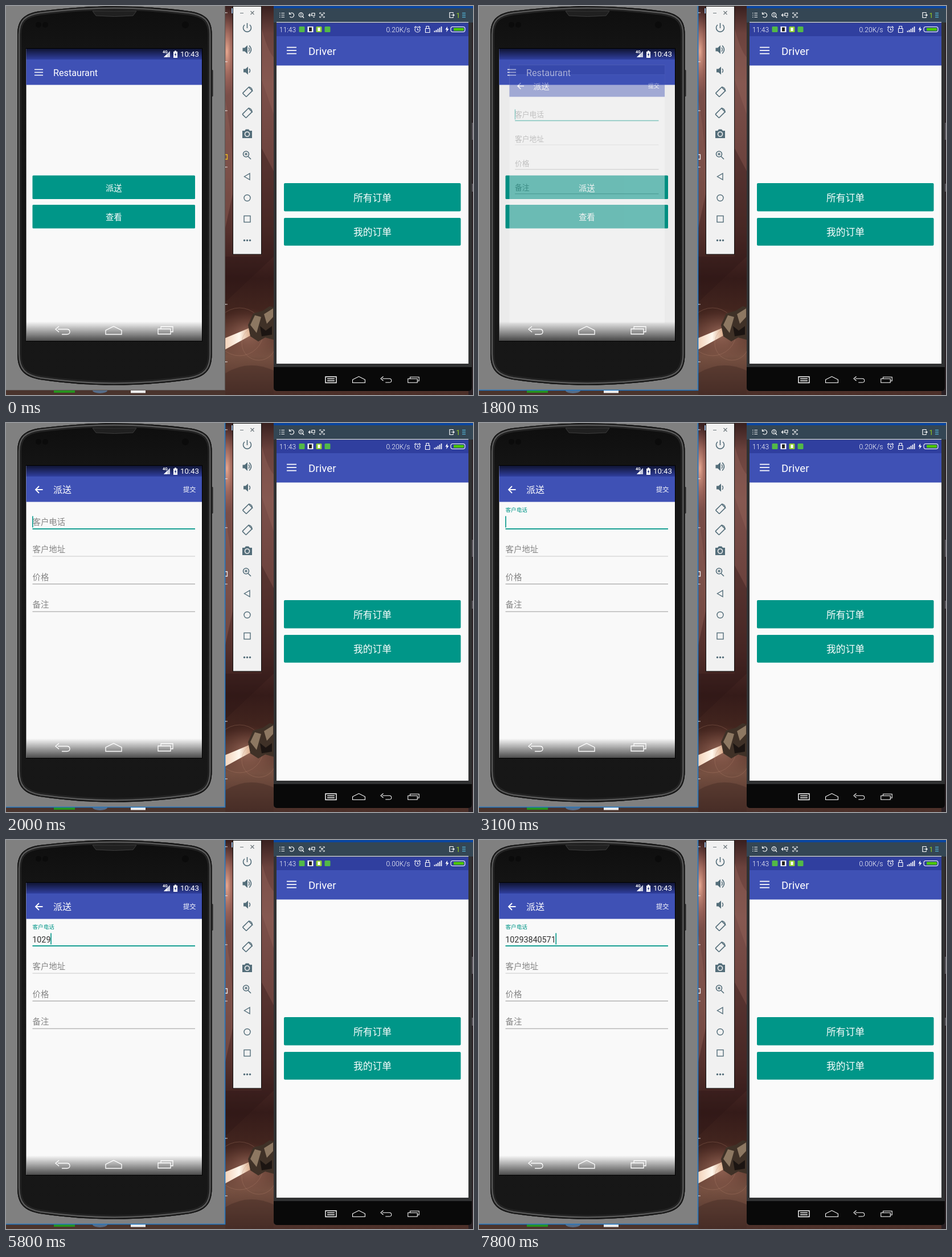
These frames come from a looping animation (820x683 px, 8 s). An HTML page:

```html
<!DOCTYPE html>
<html lang="zh">
<head>
<meta charset="utf-8">
<title>Delivery apps</title>
<style>
html, body { margin: 0; width: 100%; height: 100%; overflow: hidden; background: #3a221e; }
svg { display: block; width: 820px; height: 683px; }
text { font-family: Roboto, "Noto Sans CJK SC", "Noto Sans CJK", sans-serif; white-space: pre; }
.m { text-anchor: middle; }
.w { fill: #fff; }
.line { fill: none; stroke: #fff; }
.tool { fill: none; stroke: #546e7a; stroke-width: 1.6; }
.solid { fill: #546e7a; stroke: none; }
.hint { fill: #858585; font-size: 14.4px; }
</style>
</head>
<body>
<svg viewBox="0 0 820 683">
<defs>
  <linearGradient id="wall" x2="0" y2="1">
    <stop offset="0" stop-color="#38201f"/><stop offset=".07" stop-color="#6b423d"/>
    <stop offset=".2" stop-color="#7c504a"/><stop offset=".42" stop-color="#6b423d"/>
    <stop offset=".58" stop-color="#54302c"/><stop offset=".7" stop-color="#351b19"/>
    <stop offset=".79" stop-color="#44261f"/><stop offset=".9" stop-color="#765041"/>
    <stop offset="1" stop-color="#4a2e28"/>
  </linearGradient>
  <radialGradient id="glow"><stop offset="0" stop-color="#f5b49a" stop-opacity=".9"/><stop offset="1" stop-color="#b0655a" stop-opacity="0"/></radialGradient>
  <linearGradient id="beam" x2="1"><stop offset="0" stop-color="#f3d3bb"/><stop offset=".5" stop-color="#fff8ee"/><stop offset="1" stop-color="#f0b78c" stop-opacity=".7"/></linearGradient>
  <linearGradient id="glass" x2="0" y2="1"><stop offset="0" stop-color="#0e0e0e"/><stop offset=".15" stop-color="#161616"/><stop offset="1" stop-color="#171717"/></linearGradient>
  <linearGradient id="top" x2="0" y2="1"><stop offset="0" stop-opacity=".68"/><stop offset="1" stop-opacity="0"/></linearGradient>
  <linearGradient id="foot" x2="0" y2="1"><stop offset="0" stop-opacity="0"/><stop offset="1" stop-opacity=".7"/></linearGradient>
  <clipPath id="screen"><path d="M35.500 75H344V588H35.500Z"/></clipPath>
  <path id="body" d="M20 50C20 24 32 13 60 9C110 3 150 .5 190 .5S272 3 321 9C350 13 361.500 24 361.500 50V611C361.500 640 349 651 322 656C272 663 232 665.500 190 665.500S110 663 60 656C33 651 20 640 20 611Z"/>
  <clipPath id="shell"><use href="#body"/></clipPath>
  <g id="back"><path d="M-8 -3H8Q13 -3 13 1.500T8 6H-1M-6 -8L-12 -3L-6 2"/></g>
  <path id="home" d="M-14 7V0L0 -7L14 0V7Z"/>
  <g id="recent"><path d="M-13 -2H9V7H-13ZM-8 -2V-6H13V3H9"/></g>
  <path id="burger" d="M0 0H15M0 5H15M0 10H15"/>
  <g id="turn">
    <rect x="-7.500" y="-4.500" width="15" height="9" rx="1" transform="rotate(45)"/>
    <path d="M-9 -1Q-8.500 -8 -2 -9" stroke-width="1.300"/>
  </g>
</defs>

<!-- desktop -->
<rect width="820" height="683" fill="url(#wall)"/>
<ellipse cx="388" cy="80" rx="18" ry="78" fill="url(#glow)"/>
<path d="M385 165Q400 240 398 330L385 390ZM449 40Q460 80 470 90V190L449 130Z" fill="#93645a" opacity=".4"/>
<path d="M449 250L470 290V440L385 520V440H449Z" fill="#2c1616" opacity=".35"/>
<ellipse cx="425" cy="575" rx="58" ry="45" fill="url(#glow)" opacity=".4"/>
<path d="M385 583L428 565L434 576L385 603Z" fill="url(#beam)"/>
<g fill="none" stroke="#b98970" stroke-opacity=".3"><circle cx="410" cy="572" r="42"/><circle cx="444" cy="592" r="30"/></g>
<path d="M425 560L434 540L451 535L463 527L470 529V586L455 582L443 589L429 580Z" fill="#3f3127"/>
<path d="M429 560L437 543L448 546L440 574ZM453 541L469 531V546L458 558Z" fill="#8d7862"/>
<path d="M446 562L456 570L467 562V577L449 580Z" fill="#1c1512"/>
<path d="M385 645Q425 620 470 640V683H385Z" fill="#432b24" opacity=".45"/>
<rect y="674" width="385" height="9" fill="#4a342d"/>
<rect x="84" y="674" width="37" height="5" fill="#26931e"/>
<ellipse cx="165" cy="675" rx="13" ry="5" fill="#566d89"/>
<rect x="219" y="674" width="26" height="5.500" fill="#eee"/>
<rect x="812" width="8" height="683" fill="#2a2024"/>
<path d="M819 312V326M819 205V235" stroke="#8e8a96"/>
<rect x="396" y="4" width="3" height="9" fill="#9ab6da"/>
<g id="specks" fill="#fff"></g>
<path id="mark" d="M385 261H388.500V269H385" fill="none" stroke-width="1.300"/>

<!-- emulator -->
<rect width="384" height="674" fill="#808080"/>
<path d="M384.500 0V674.500H0" fill="none" id="edge"/>
<rect x="360" y="112" width="3.500" height="47" rx="1.500" fill="#252525"/>
<g clip-path="url(#shell)" fill="none">
  <use href="#body" fill="url(#glass)" stroke="#232323" stroke-width="14"/>
  <use href="#body" stroke="#666" stroke-width="8"/>
  <use href="#body" stroke="#303030" stroke-width="5"/>
  <use href="#body" stroke="#0b0b0b" stroke-width="2"/>
</g>
<path d="M152 9H229L223 17Q190 20 158 17Z" fill="#202020" stroke="#3c3c3c"/>
<g fill="#0b0b0b"><circle cx="57" cy="33" r="5"/><circle cx="69" cy="33" r="5"/><circle cx="315" cy="33" r="6"/></g>
<path d="M34.500 74H345V589H34.500Z" fill="#000"/>

<g clip-path="url(#screen)">
  <g id="main">
    <rect x="35" y="75" width="310" height="513" fill="#f9f9f9"/>
    <rect x="35" y="75" width="310" height="19" fill="#303f9f"/>
    <rect x="35" y="94" width="310" height="44.500" fill="#3f51b5"/>
    <use href="#burger" x="50" y="111.500" class="line" stroke-width="1.700"/>
    <text x="83" y="123" class="w" font-size="16.200">Restaurant</text>
    <g fill="#009688"><rect x="46.500" y="297.500" width="285.500" height="41.500" rx="1.500"/><rect x="46.500" y="349" width="285.500" height="41.500" rx="1.500"/></g>
    <g class="m w" font-size="14.400" font-weight="500"><text x="189.300" y="324.500">派送</text><text x="189.300" y="376">查看</text></g>
    <rect id="dim" x="35" y="139" width="310" height="449" fill="#000" opacity=".055"/>
  </g>
  <g id="sheet">
    <rect x="35.500" y="75" width="308.500" height="513" fill="#f9f9f9"/>
    <rect x="35.500" y="75" width="308.500" height="19" fill="#303f9f"/>
    <rect x="35.500" y="94" width="308.500" height="44.500" fill="#3f51b5"/>
    <path d="M64.500 117H52.500M58 111L52 117L58 123" class="line" stroke-width="1.800"/>
    <text x="83" y="123" class="w" font-size="16" font-weight="500">派送</text>
    <text x="311" y="121.300" class="w" font-size="11.200" font-weight="500">提交</text>
    <text id="label" x="46.500">客户电话</text>
    <g class="hint"><text x="46.500" y="227">客户地址</text><text x="46.500" y="275.500">价格</text><text x="46.500" y="324">备注</text></g>
    <text id="typed" x="46.300" y="179.500" font-size="14.300" fill="#303030"></text>
    <rect x="46.500" y="185" width="285.500" height="1.800" fill="#009688"/>
    <g fill="#aaa"><rect x="46.500" y="233.500" width="285.500" height="1" fill="#cacaca"/><rect x="46.500" y="282" width="285.500" height="1.300"/><rect x="46.500" y="330.600" width="285.500" height="1.200"/></g>
    <rect id="caret" y="163.500" width="1.600" height="20" fill="#009688"/>
  </g>
  <rect x="35" y="75" width="310" height="19" fill="url(#top)"/>
  <rect x="35" y="554" width="310" height="34" fill="url(#foot)"/>
</g>
<text x="275" y="83" class="w" font-size="7" font-weight="700">4G</text>
<path d="M288 79V90H277Z" fill="#c8cce0"/><path d="M283 84V90H277Z" class="w"/>
<path d="M294 80H296V78.500H299V80H301V91H294Z" class="w"/><path d="M298 81.500L295.800 86H297.500L297 89.500L299.500 84.500H297.800Z" fill="#26327c"/>
<text x="306" y="89" class="w" font-size="13.200">10:43</text>
<g class="line" stroke-width="1.300"><use href="#back" x="99" y="570.500"/><use href="#home" x="189" y="569.500"/><use href="#recent" x="280" y="569"/></g>

<!-- emulator tools -->
<rect x="398.500" y=".5" width="50" height="435.500" fill="#f1f1f1" stroke="#111"/>
<path d="M411 12.500H417M429.500 9L435.500 15M435.500 9L429.500 15" stroke="#6d777c" stroke-width="1.200"/>
<g class="tool">
  <path d="M423.500 30V39M419 33A7 7 0 1 0 428 33"/>
  <path class="solid" d="M415.500 73.500H419L424 69V84L419 79.500H415.500Z"/><path d="M426 73Q428.500 76.500 426 80M427 69.500Q434 76.500 427 83.500" stroke-width="1.500"/>
  <path class="solid" d="M417 110.500H420.500L425 106.500V120.500L420.500 116.500H417Z"/><path d="M427 110Q430 113.500 427 117" stroke-width="1.500"/>
  <use href="#turn" transform="translate(424 151) rotate(90) scale(1 -1) rotate(-90)"/>
  <use href="#turn" transform="translate(423.500 188) rotate(90) scale(-1 1) rotate(-90) scale(1 -1) scale(-1 1)"/>
  <path class="solid" d="M415 219H419L421 216.500H426L428 219H432V232H415Z"/><circle cx="423.500" cy="225" r="4" fill="#546e7a" stroke="#f1f1f1"/>
  <circle cx="421.500" cy="260" r="5"/><path d="M425 264L430 269M419 260H424M421.500 257.500V262.500"/>
  <path d="M428 294V305L418.500 299.500Z" stroke-width="1.400"/>
  <circle cx="423.500" cy="337" r="5.500" stroke-width="1.400"/>
  <rect x="418" y="368.500" width="11" height="11" stroke-width="1.400"/>
  <g class="solid"><circle cx="418.500" cy="411.500" r="1.700"/><circle cx="423.500" cy="411.500" r="1.700"/><circle cx="428.500" cy="411.500" r="1.700"/></g>
</g>

<!-- second phone -->
<path d="M470 0H818V670Q818 676 811 676H477Q470 676 470 670Z" fill="#303132"/>
<rect x="470" width="350" height="4" fill="#0a46a0"/>
<rect x="470" y="4" width="350" height="25" fill="#344654"/>
<path d="M470 634H818V670Q818 676 811 676H477Q470 676 470 670Z" fill="#090909"/>
<rect x="475" y="28" width="337" height="1.300" fill="#e5e7ea"/>
<rect x="475" y="29.500" width="337" height="24" fill="#303f9f"/>
<rect x="475" y="53" width="337" height="52" fill="#3f51b5"/>
<rect x="475" y="104.500" width="337" height="523.500" fill="#fafafa"/>
<g class="line" stroke="#dfe6e9" stroke-width="1.200">
  <path d="M480 12.500H481.500M480 16H481.500M480 19.500H481.500M483.500 12.500H489M483.500 16H489M483.500 19.500H489"/>
  <path d="M498.500 13.500A4 4 0 1 1 498.500 18.500M497.500 11V14.500H501"/>
  <circle cx="518" cy="15.500" r="3.700"/><path d="M520.500 18L523 21M518 13.500V17.500"/>
  <path d="M532 16H537M534 13.500L531.500 16L534 18.500M537 12.500H542V17H537ZM539 19.500H542"/>
  <path d="M551 14V12H553.500M556.500 12H559V14M559 18V20H556.500M553.500 20H551V18M553 14L557 18M557 14L553 18"/>
  <path d="M785 13V11.500H779V20.500H785V19M782 16H787M785 14L787 16L785 18"/>
</g>
<text x="790.500" y="20.500" font-size="12" fill="#9bd51e">1</text>
<path d="M801 12.500H807M801 16H807M801 19.500H807" stroke="#4fa9c9" stroke-width="1.300"/>
<text x="480" y="45.500" class="w" font-size="12" font-weight="300">11:43</text>
<g fill="#52b947"><rect x="514.500" y="36" width="10" height="10" rx="1.500"/><rect x="529.500" y="36" width="10" height="10" fill="#fff"/><rect x="532" y="37.500" width="5" height="7" fill="#222"/><rect x="544.500" y="36" width="10" height="10" rx="1.500" fill="#8fce35"/><rect x="547.500" y="38" width="4" height="6" fill="#fff"/><rect x="559.500" y="36" width="10" height="10" rx="1.500"/></g>
<text id="rate" x="667.500" y="45.500" class="w" font-size="12.200" font-weight="300"></text>
<g class="line" stroke-width="1.100">
  <circle cx="722.500" cy="41.500" r="4.500"/><path d="M722.500 39V42H725M717 38L720 35.500M728 38L725 35.500"/>
  <path d="M736.500 39.500H744V46.500H736.500ZM738 39.500V35.500H742.500V39.500"/>
  <path d="M752.500 46V43.500M755.500 46V42M758.500 46V40M761.500 46V38M764.500 46V36" stroke-width="1.700"/>
  <rect x="781" y="36.500" width="25" height="9" rx="3.500"/>
</g>
<path d="M775 36L771.500 41.500H774L773 46L777.500 40H775Z" class="w"/>
<rect x="786" y="38.500" width="18" height="5" rx="1" fill="#4dc800"/>
<path d="M493 72.700H510M493 78.200H510M493 83.700H510" stroke="#fff" stroke-width="1.700"/>
<text x="531" y="86" class="w" font-size="18.800">Driver</text>
<g fill="#009688"><rect x="488" y="311" width="310.500" height="49.500" rx="2"/><rect x="488" y="372" width="310.500" height="48.700" rx="2"/></g>
<g class="m w" font-size="16.800"><text x="643.500" y="343">所有订单</text><text x="643.500" y="403">我的订单</text></g>
<g class="line" stroke-width="1.400">
  <path d="M561 651H580V661.500H561ZM564 654.500H577M564 658H577"/>
  <use href="#home" transform="translate(619.500 656) scale(.78)"/>
  <use href="#back" transform="translate(667 656.500) scale(.75)"/>
  <use href="#recent" transform="translate(715.500 656) scale(.75)"/>
</g>
</svg>
<script>
const LOOP = 8000, PHONE = '10293840571';
const KEYS = [3600, 4800, 5100, 5700, 6000, 6200, 6500, 6900, 7200, 7500, 7800];
const BLINKS = [[2700, 3100], [4000, 4500], [5500, 5700]];
const $ = id => document.getElementById(id);
const set = (id, attrs) => { for (const k in attrs) $(id).setAttribute(k, attrs[k]); };
const mix = (a, b, p) => a + (b - a) * p;

$('specks').innerHTML = [11, 97, 183, 282, 523, 624]
  .map(y => `<rect x="385" y="${y}" width="1.5" height="1.5"/><rect x="387.5" y="${y}" width="1" height="1.5"/>`).join('');

function draw(t) {
  const active = t >= 1500, open = t >= 1800;
  set('edge', { stroke: active ? '#1f78c6' : '#5c5654', 'stroke-width': active ? 1.6 : 1.2 });
  set('mark', { stroke: active ? '#eee' : '#f0c020' });

  // the form zooms in on 100 ms ticks
  const tick = Math.floor((t - 1800) / 100);
  const scale = [0.884, 0.975][tick] || 1;
  const alpha = [0.43, 0.93][tick] || 1;
  set('sheet', {
    opacity: open ? alpha : 0,
    transform: `translate(189.5 319) scale(${scale}) translate(-189.5 -319)`
  });
  set('dim', { opacity: open ? 0.055 : 0 });

  // hint shrinks into a floating label
  const p = tick < 3 ? 0 : tick < 4 ? 0.6 : 1;
  const rgb = [[133, 0], [133, 150], [133, 136]].map(([a, b]) => Math.round(mix(a, b, p)));
  set('label', { y: mix(178.5, 156, p), 'font-size': mix(14.4, 9.6, p), fill: `rgb(${rgb})` });

  const count = KEYS.filter(k => t >= k).length;
  $('typed').textContent = PHONE.slice(0, count);
  const hidden = BLINKS.some(([a, b]) => t >= a && t < b);
  set('caret', { x: 46.1 + count * 8.03, opacity: hidden ? 0 : 1 });
  $('rate').textContent = t < 5800 ? '0.20K/s' : '0.00K/s';
}

const start = performance.now();
function frame() {
  draw((performance.now() - start) % LOOP);
  requestAnimationFrame(frame);
}
frame();
</script>
</body>
</html>
```
